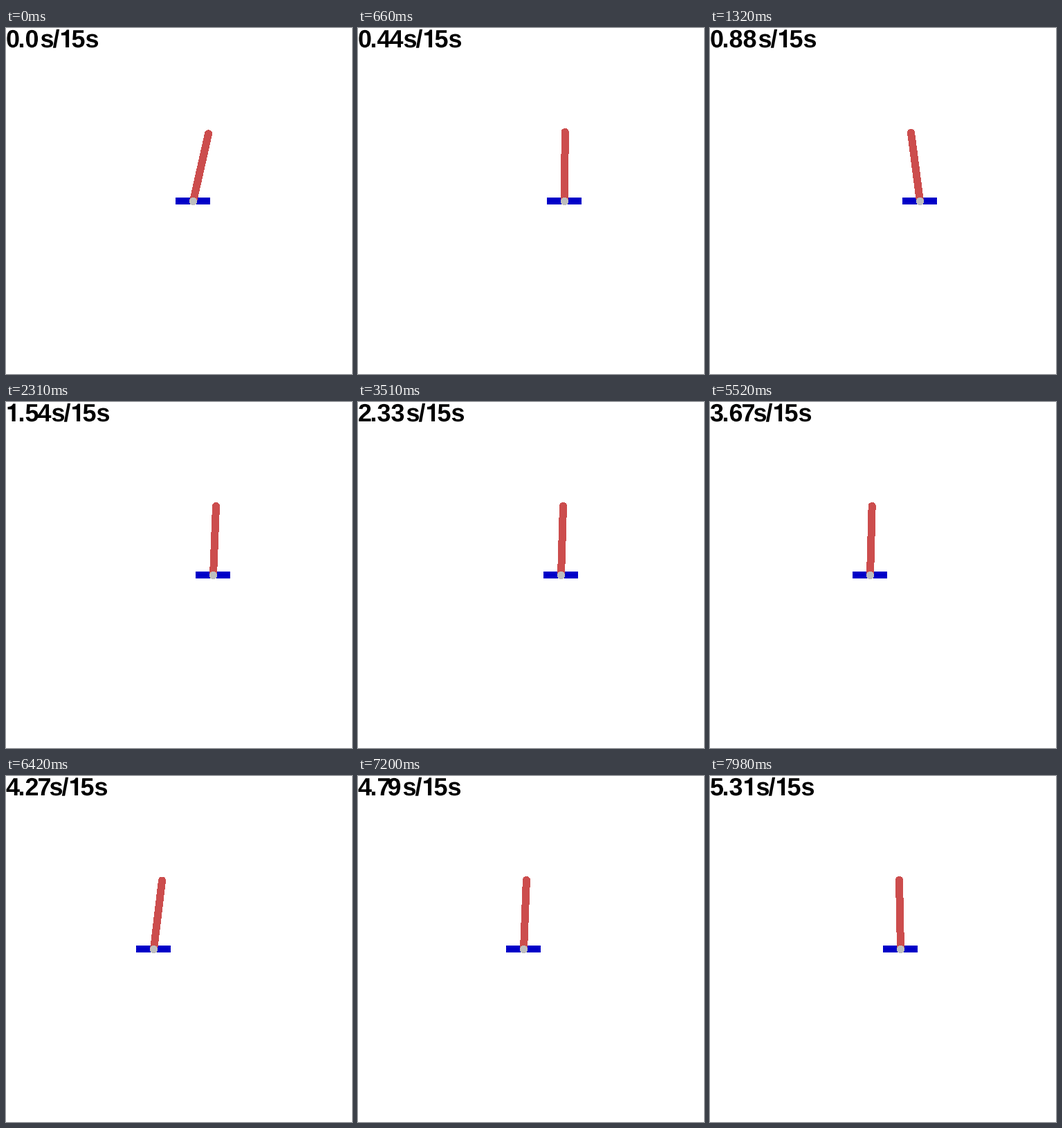
A matplotlib script that plays this animation: 500 by 500 pixels, repeating every 8000 ms.

```python
import math

import matplotlib.pyplot as plt
import numpy as np
from matplotlib.animation import FuncAnimation
from matplotlib.patches import Circle, PathPatch, Polygon, Rectangle
from matplotlib.path import Path
from matplotlib.textpath import TextPath
from matplotlib.transforms import Affine2D

SIZE = 500
LOOP_MS, TICK_MS, STEP_MS = 8000, 20, 30
STEPS = math.ceil(LOOP_MS / STEP_MS)
TRACK_Y = 250
POLE_LEN, RADIUS = 100, 5
FONT_PX, BASELINE = 36, 28

BLUE = "#0000c8"
RED = "#cc4d4d"
GREY = "#bebebe"

# Turning points of the balancing act: step, cart centre, lean of the tip
POSES = [(0, 270, 22), (24, 300, -1), (44, 303, -13), (65, 307, -5),
         (77, 299, 4), (89, 307, -4), (117, 293, 3), (155, 268, -2.5),
         (189, 226, 4), (214, 213, 12), (243, 243, 3), (266, 275, -2)]


def smooth(t, v, at):
    """Cubic Hermite curve through (t, v), flat at turning points."""
    slope = np.gradient(v, t)
    d = np.diff(v)
    slope[1:-1][d[:-1] * d[1:] <= 0] = 0
    slope[0] = 0
    i = np.clip(np.searchsorted(t, at, side="right") - 1, 0, len(t) - 2)
    h = t[i + 1] - t[i]
    u = (at - t[i]) / h
    ease = u * u * (3 - 2 * u)
    return (v[i] + (v[i + 1] - v[i]) * ease
            + h * u * (1 - u) * (slope[i] * (1 - u) - slope[i + 1] * u))


def clock_labels():
    """Simulated seconds, two substeps per step, cut to two decimals."""
    labels, t = [], 0.0
    for _ in range(STEPS):
        labels.append(f"{int(t * 100) / 100}s/15s")
        t += 0.01
        t += 0.01
    return labels


def plain_one():
    """A figure one without a foot."""
    pts = [(.378, 0), (.238, 0), (.238, .484), (.069, .484), (.069, .584),
           (.24, .584), (.283, .709), (.378, .709), (.378, 0)]
    codes = ([Path.MOVETO] + [Path.LINETO] * 4 + [Path.CURVE3] * 2
             + [Path.LINETO, Path.CLOSEPOLY])
    return Path(np.array(pts) * FONT_PX, codes)


def glyph(char):
    if char == "1":
        path = plain_one()
    else:
        path = TextPath((0, 0), char, size=FONT_PX,
                        prop={"family": "Liberation Sans", "weight": "bold"})
    return path.transformed(Affine2D().scale(1, -1))


GLYPHS = {c: glyph(c) for c in "0123456789./s"}
KERN_AFTER = {"1": -3, "4": -2, "5": -2, "7": -5, "s": -2}
KERN_BEFORE = {"7": -2, "s": 2}


def advance(a, b):
    width = 10 if a in "./" else 20
    if b == ".":
        return width - 2.5
    if a == ".":
        return width
    return width + KERN_AFTER.get(a, 0) + KERN_BEFORE.get(b, 0)


def text_path(text):
    parts, x = [], 0
    for a, b in zip(text, text[1:] + " "):
        parts.append(GLYPHS[a].transformed(Affine2D().translate(x, BASELINE)))
        x += advance(a, b)
    return Path.make_compound_path(*parts)


key_step, key_cart, key_lean = np.array(POSES, float).T
steps = np.arange(STEPS)
cart_x = np.rint(smooth(key_step, key_cart, steps))
lean = smooth(key_step, key_lean, steps)
labels = clock_labels()

fig = plt.figure(figsize=(5, 5), dpi=100, facecolor="white")
ax = fig.add_axes([0, 0, 1, 1])
ax.set_xlim(0, SIZE)
ax.set_ylim(SIZE, 0)
ax.axis("off")


def add(shape, *args, color, crisp=True):
    patch = shape(*args, fc=color, lw=0, antialiased=not crisp)
    return ax.add_patch(patch)


cart = add(Rectangle, (0, TRACK_Y - 5), 50, 10, color=BLUE)
pole = add(Polygon, [(0, 0)] * 4, color=RED)
tip = add(Circle, (0, 0), RADIUS, color=RED)
joint = add(Circle, (0, 0), RADIUS, color=GREY)
clock = add(PathPatch, text_path(labels[0]), color="black", crisp=False)


def update(n):
    k = min((n * TICK_MS + TICK_MS // 2) // STEP_MS, STEPS - 1)
    angle = math.asin(lean[k] / POLE_LEN)
    along = np.array([math.sin(angle), -math.cos(angle)])
    side = RADIUS * np.array([-along[1], along[0]])
    base = np.array([cart_x[k], TRACK_Y]) + 0.5
    end = base + POLE_LEN * along

    cart.set_x(cart_x[k] - 25)
    pole.set_xy([base - side, base + side, end + side, end - side])
    tip.center = end
    joint.center = base
    clock.set_path(text_path(labels[k]))
    return cart, pole, tip, joint, clock


anim = FuncAnimation(fig, update, frames=LOOP_MS // TICK_MS,
                     interval=TICK_MS, repeat=True, repeat_delay=0,
                     init_func=lambda: update(0))
plt.show()
```
